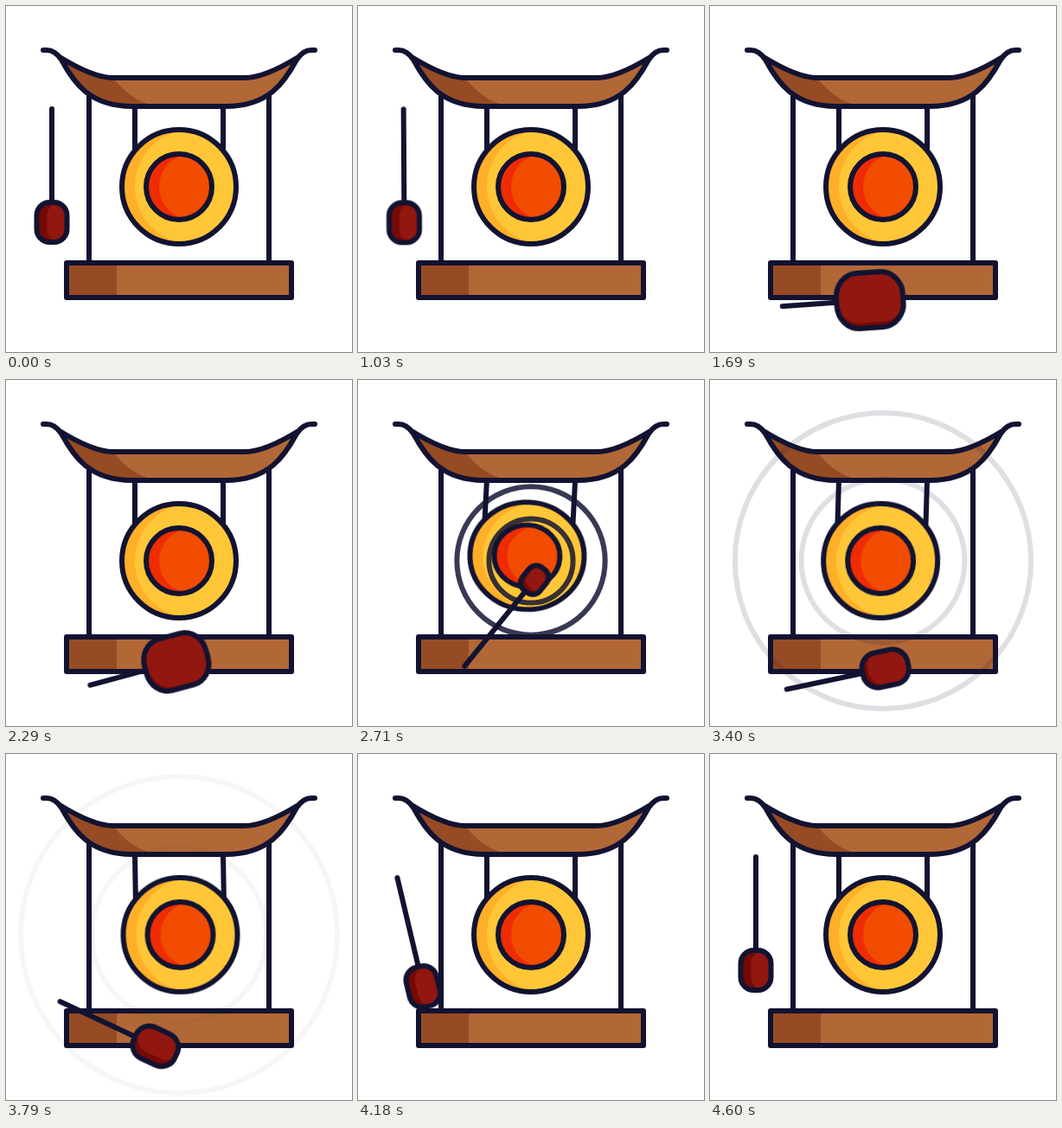
Animation, 400 px wide and 400 px high, one loop 4630 ms. Source, as an HTML page without scripts:

```html
<!DOCTYPE html>
<html lang="en">
<head>
<meta charset="utf-8">
<title>Gong</title>
<style>
@property --x { syntax: "<length>"; inherits: true; initial-value: 53px; }
@property --y { syntax: "<length>"; inherits: true; initial-value: 250px; }
@property --turn { syntax: "<angle>"; inherits: true; initial-value: 0deg; }
@property --reach { syntax: "<number>"; inherits: true; initial-value: 1; }
@property --wide { syntax: "<number>"; inherits: true; initial-value: 1; }
@property --long { syntax: "<number>"; inherits: true; initial-value: 1; }
@property --lx { syntax: "<length>"; inherits: true; initial-value: 12px; }
@property --ly { syntax: "<length>"; inherits: true; initial-value: 0px; }

html, body { margin: 0; height: 100%; overflow: hidden; background: #fff; }
svg { display: block; width: 100vw; height: 100vh; }

.line { fill: none; stroke: #121331; stroke-width: 6; stroke-linecap: round; stroke-linejoin: round; }
.wood { fill: #b26836; }
.wood-dark { fill: #964b24; }
.gold { fill: #ffc738; }
.gold-dark { fill: #ffaf28; }
.core { fill: #f24c00; }
.core-dark { fill: #ee2c00; }
.felt { fill: #911710; }
.felt-dark { fill: #740a06; }

.gong, .ring, .mallet { animation: 4630ms linear infinite; }

/* Gong: tilts back on the hit, then swings out */
.gong { transform-origin: 200px 116px; animation-name: swing; animation-timing-function: ease-in-out; }
@keyframes swing {
  0%, 57.02% { transform: none; animation-timing-function: ease-out; }
  58.6% { transform: rotate(3deg) scaleY(.94); }
  66.3% { transform: rotate(-2.8deg); }
  74% { transform: rotate(1.8deg); }
  81.5% { transform: rotate(-.95deg); }
  88%, 100% { transform: none; }
}

/* Sound rings */
.ring { opacity: 0; animation-name: spread; }
.ring.inner { --from: 38px; --to: 103px; }
.ring.outer { --from: 66px; --to: 187px; }
@keyframes spread {
  0%, 57.1% { r: var(--from); opacity: 0; }
  57.11% { r: var(--from); opacity: 1; animation-timing-function: cubic-bezier(.15, .65, .35, 1); }
  92.8%, 100% { r: var(--to); opacity: 0; }
}

/* Mallet: position is the centre of the head */
.mallet { transform: translate(var(--x), var(--y)) rotate(var(--turn)); animation-name: strike; }
.handle { transform: scaleY(var(--reach)); }
.head { transform: scale(var(--wide), var(--long)); }
.felt { transform: translate(var(--lx), var(--ly)); }
.handle, .head .line { vector-effect: non-scaling-stroke; }
@keyframes strike {
  0%, 21.6% { --x: 53px; --y: 250px; --turn: 0deg; --reach: 1; --wide: 1; --long: 1; --lx: 12px; --ly: 0px;
    animation-timing-function: cubic-bezier(.5, 0, .8, .7); }
  29.16% { --x: 112px; --y: 302px; --turn: -46deg; --reach: .9; --wide: 1.32; --long: 1.27; --lx: 8px; }
  33.26% { --x: 162px; --y: 335px; --turn: -84deg; --reach: .81; --wide: 1.65; --long: 1.55; --lx: 4px;
    animation-timing-function: cubic-bezier(.1, .4, .4, 1); }
  43.2% { --x: 196px; --y: 342.5px; --turn: -99deg; --reach: .755; --wide: 1.92; --long: 1.74; --lx: 3px; --ly: 1px;
    animation-timing-function: cubic-bezier(.6, 0, .9, .6); }
  57.02% { --x: 202px; --y: 220px; --turn: -144deg; --reach: .98; --wide: .7; --long: .7; --lx: -4px; --ly: 9px; }
  58.53% { --x: 204px; --y: 231px; --turn: -141deg; --reach: .98; --wide: .74; --long: .73; }
  62.2% { --x: 209px; --y: 262px; --turn: -133deg; --reach: .95; --wide: .92; --long: .92; }
  66.31% { --x: 210px; --y: 291px; --turn: -124.5deg; --reach: .92; --wide: 1.08; --long: 1.08; --lx: -4px; --ly: 9px; }
  71.27% { --x: 208px; --y: 325px; --turn: -110deg; --reach: .89; --wide: 1.15; --long: 1.15; }
  76.67% { --x: 195px; --y: 346px; --turn: -90deg; --reach: .89; --wide: 1.17; --long: 1.17; }
  81.86% { --x: 173px; --y: 338px; --turn: -65deg; --reach: .93; --wide: 1.13; --long: 1.13; --lx: 8px; --ly: 2px; }
  85.31% { --x: 135px; --y: 312px; --turn: -44deg; --reach: .96; --wide: 1.08; --long: 1.08; }
  88.55% { --x: 92px; --y: 281px; --turn: -22deg; --reach: .98; --wide: 1.04; --long: 1.04; }
  91.58% { --x: 63px; --y: 260px; --turn: -7deg; --reach: .99; --wide: 1.01; --long: 1.01; }
  95.03% { --x: 55px; --y: 252px; --turn: -1.5deg; }
  99.2%, 100% { --x: 53px; --y: 250px; --turn: 0deg; --reach: 1; --wide: 1; --long: 1; --lx: 12px; --ly: 0px; }
}
</style>
</head>
<body>
<svg viewBox="0 0 400 400">
  <defs>
    <path id="roof" d="M62 59C88 75 108 83 124 83H276C292 83 312 75 338 59L336 62C322 88 304 116 254 116H146C96 116 78 88 64 62Z"/>
    <circle id="disc" cx="200" cy="209" r="66"/>
    <circle id="boss" cx="200" cy="209" r="38"/>
    <rect id="pad" x="-17.5" y="-23" width="35" height="46" rx="15"/>
    <clipPath id="in-roof"><use href="#roof"/></clipPath>
    <clipPath id="in-disc"><use href="#disc"/></clipPath>
    <clipPath id="in-boss"><use href="#boss"/></clipPath>
    <clipPath id="in-pad"><use href="#pad"/></clipPath>
  </defs>

  <path class="line" d="M96 100V297M304 100V297"/>
  <rect class="wood" x="70" y="297" width="260" height="40"/>
  <rect class="wood-dark" x="70" y="297" width="58" height="40"/>
  <rect class="line" x="70" y="297" width="260" height="40"/>

  <g class="gong">
    <path class="line" d="M149 110V168M251 110V168"/>
    <use href="#disc" class="gold-dark"/>
    <g clip-path="url(#in-disc)"><use href="#disc" class="gold" x="15"/></g>
    <use href="#disc" class="line"/>
    <use href="#boss" class="core-dark"/>
    <g clip-path="url(#in-boss)"><use href="#boss" class="core" x="15"/></g>
    <use href="#boss" class="line"/>
  </g>

  <use href="#roof" class="wood"/>
  <path class="wood-dark" clip-path="url(#in-roof)" d="M60 50L124 83C134 96 150 112 176 116V120H60Z"/>
  <path class="line" d="M43 51H47C55 51 60 56 64 62C78 88 96 116 146 116H254C304 116 322 88 336 62C340 56 345 51 353 51H357M62 59C88 75 108 83 124 83H276C292 83 312 75 338 59"/>

  <circle class="line ring inner" cx="200" cy="209" r="38"/>
  <circle class="line ring outer" cx="200" cy="209" r="66"/>

  <g class="mallet">
    <path class="line handle" d="M0 -131V0"/>
    <g class="head">
      <use href="#pad" class="felt-dark"/>
      <g clip-path="url(#in-pad)"><use href="#pad" class="felt"/></g>
      <rect class="line" x="-17.5" y="-23" width="35" height="46" rx="15"/>
    </g>
  </g>
</svg>
</body>
</html>
```
